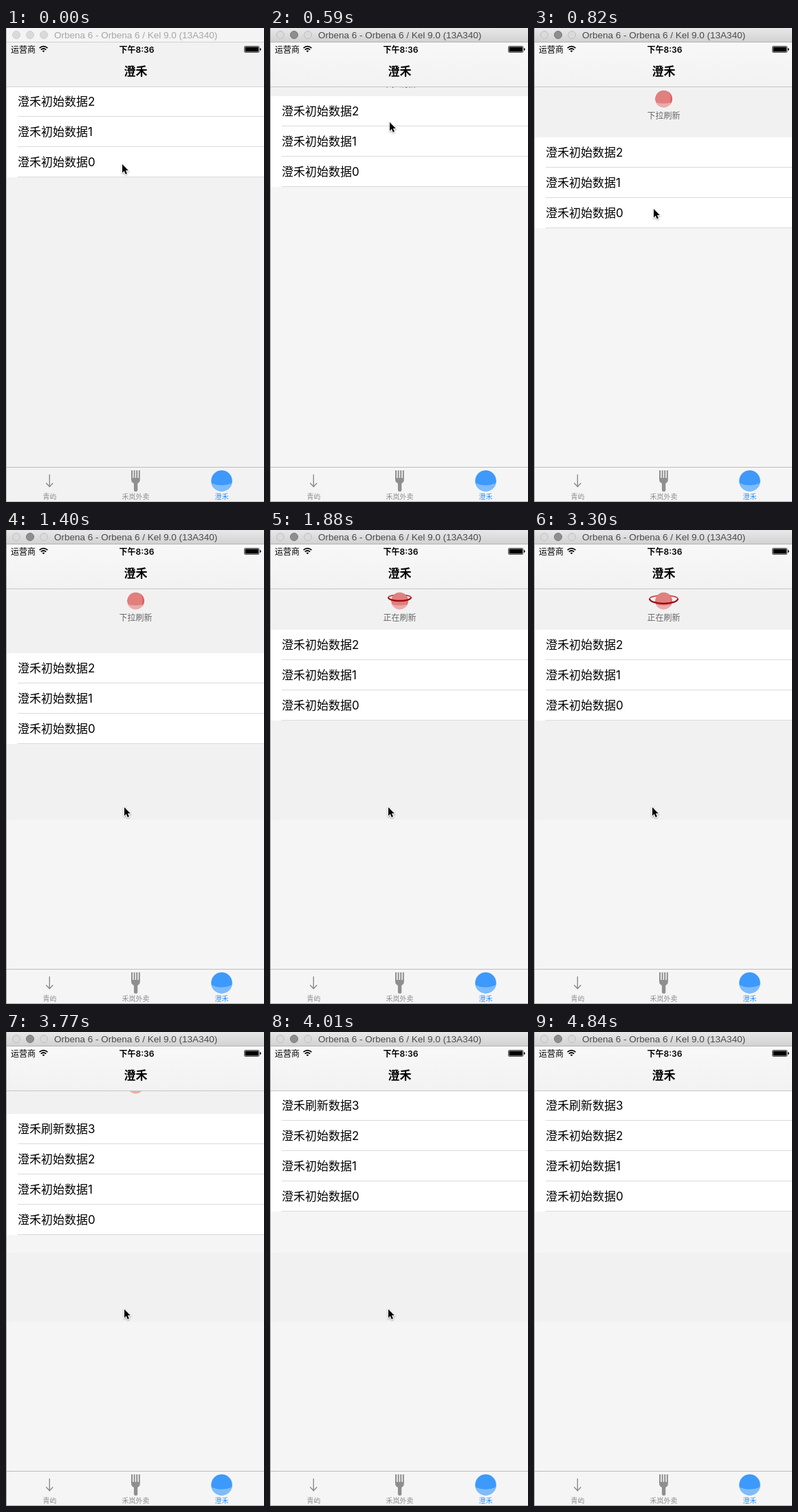
Write an HTML page that moves like this. It is 375 px wide and 689 px high and loops after 5070 ms.

```html
<!DOCTYPE html>
<html lang="zh">
<head>
<meta charset="utf-8">
<style>
  html, body { margin: 0; width: 100%; height: 100%; overflow: hidden; background: #f2f2f2; }
  svg { display: block; width: 375px; height: 689px; }
  text { font-family: Inter, "Noto Sans CJK SC", "Noto Sans CJK", sans-serif; }
  .mid { text-anchor: middle; }
  .tab text { font-size: 10px; text-anchor: middle; }
  #title { font: 13.5px "Liberation Sans", Arial, sans-serif; }
  #cursor { filter: drop-shadow(0 1px 1px rgba(0, 0, 0, .35)); }
</style>
</head>
<body>
<svg viewBox="0 0 375 689">
  <defs>
    <linearGradient id="chrome" x2="0" y2="1">
      <stop stop-color="#e8e8e8"/><stop offset="1" stop-color="#d2d2d2"/>
    </linearGradient>
    <linearGradient id="navFill" x2="0" y2="1">
      <stop stop-color="#f8f8f8"/><stop offset="1" stop-color="#f2f2f2"/>
    </linearGradient>
    <clipPath id="ball"><circle r="12.5"/></clipPath>
    <clipPath id="tabBall"><circle cx="313.5" cy="658.2" r="15.3"/></clipPath>
  </defs>

  <rect id="page" width="375" height="689"/>
  <rect id="gap" y="86" width="375" fill="#f1f1f1"/>
  <rect id="band" width="375" fill="#f1f1f1"/>

  <g id="header">
    <g transform="translate(188.5 103)">
      <path id="back" fill="none" stroke="#b03a3c" stroke-width="1.5"/>
      <g clip-path="url(#ball)">
        <circle r="12.5" fill="#e27f7f"/>
        <path id="shade" d="M6-12Q13-3 8 8L14 8V-12Z" fill="#df5f5f"/>
        <path d="M-13 4Q-3 9 13 5V13H-13Z" fill="#ecabab"/>
      </g>
      <path id="front" fill="none" stroke="#a00c10" stroke-width="2.3"/>
    </g>
    <text id="label" class="mid" x="188.5" y="132" font-size="12" fill="#666"></text>
  </g>

  <g id="list"></g>

  <rect id="nav" y="20" width="375" height="65"/>
  <rect id="navLine" y="85" width="375" height="1"/>
  <text x="7" y="35.5" font-size="12">运营商</text>
  <g fill="none" stroke="#000" stroke-width="1.7">
    <path d="M48.6 29.2Q54.5 24 60.4 29.2M50.8 31.6Q54.5 28.4 58.2 31.6"/>
    <path d="M52.6 33.2Q54.5 31.6 56.4 33.2L54.5 35.3Z" fill="#000" stroke="none"/>
  </g>
  <text class="mid" x="190" y="35.5" font-size="12" font-weight="600">下午8:36</text>
  <rect x="346.5" y="26.5" width="21.5" height="9" rx="1.5" fill="none" stroke="#555"/>
  <rect x="347.5" y="27.5" width="19.5" height="7"/>
  <path d="M369 29Q370.8 29.5 370.8 31T369 33Z"/>
  <text class="mid" x="188.5" y="69" font-size="17" font-weight="600">澄禾</text>

  <rect id="bar" width="375" height="20"/>
  <rect id="barLine" y="20" width="375" height="1"/>
  <g id="lights" stroke-width="1">
    <circle cx="15" cy="10" r="5.5"/><circle cx="35" cy="10" r="5.5"/><circle cx="55" cy="10" r="5.5"/>
  </g>
  <text id="title" x="70" y="15">Orbena 6 - Orbena 6 / Kel 9.0 (13A340)</text>

  <g class="tab" fill="#8f8f8f">
    <rect id="tabFill" y="639" width="375" height="49"/>
    <rect y="638" width="375" height="1" fill="#bdbdbd"/>
    <path d="M63.3 649V666.5M58.3 661.5L63.3 666.7L68.3 661.5" fill="none" stroke="#8a8a8a" stroke-width="1.4"/>
    <path d="M182 643h2v11h1.6v-11h2v11h1.6v-11h2v11h1.6v-11h2v13.500q0 3.500-3.500 5.500v9.500q0 2.300-2.700 2.300t-2.700-2.300v-9.500q-3.900-2-3.900-5.500Z"/>
    <g clip-path="url(#tabBall)">
      <rect x="298" y="642" width="32" height="32" fill="#3d99fc"/>
      <path d="M298 661.5Q313 668 329 661.5V674H298Z" fill="#7dbcfd"/>
    </g>
    <text x="63.5" y="685">青屿</text>
    <text x="188.5" y="685">禾岚外卖</text>
    <text x="313.5" y="685" fill="#2f8ff8">澄禾</text>
  </g>
  <rect id="edge" width="1" height="689"/>
  <rect id="foot" y="688" width="375" height="1"/>
  <path id="cursor" d="M1 1V13.5L3.8 10.8L5.8 15.5L7.9 14.6L5.9 10H9.8Z" stroke="#fff" stroke-width="1.8" paint-order="stroke"/>
</svg>
<script>
const LOOP = 5070, STEP = 117.8, LEAD = 14, LAST = 41;
const ROW = 44, TOP = 85, HOLD = 60;
const REFRESH = 13, LOADED = 31, ACTIVE = 5;

// tracks: [step, value, ...]
const pull = [[4, 0], [5, 14], [6, 46], [7, 74], [8, 99], [9, 119], [10, 128], [11, 120],
  [12, 94], [13, 74], [14, 64], [15, 60], [31, 60], [32, 34], [33, 10], [34, 0]];
const pointer = [[0, 168, 197], [2, 172, 135], [4, 173, 111], [5, 173, 136], [6, 173, 200],
  [7, 173, 262], [8, 172, 325], [9, 171, 375], [10, 171, 401], [11, 171, 402], [35, 171, 402],
  [36, 212, 449], [37, 301, 562], [38, 327, 608], [39, 335, 650], [40, 342, 687]];
// half width, centre, front depth, back depth
const ring = [[13, 13.5, -6, 3, 3], [16, 16.5, -5, 5, 3.5], [20, 18.5, 2, 6, 4], [23, 19.5, 3, 8, 5],
  [25, 19.5, 1, 7, 4], [28, 20.5, -3, 7, 5], [30, 22.5, -3, 7, 5]];

const $ = id => document.getElementById(id);
const set = (id, attrs) => {
  for (const name in attrs) $(id).setAttribute(name, attrs[name]);
};
const show = (id, on) => set(id, { visibility: on ? 'visible' : 'hidden' });

function sample(track, k) {
  const i = track.findIndex(key => key[0] > k);
  if (i < 0) return track[track.length - 1].slice(1);
  if (i === 0) return track[0].slice(1);
  const a = track[i - 1], b = track[i], p = (k - a[0]) / (b[0] - a[0]);
  return a.slice(1).map((v, n) => v + (b[n + 1] - v) * p);
}

const rowMarkup = (text, i) =>
  `<rect y="${i * ROW}" width="375" height="${ROW}" fill="#fff"/>` +
  `<rect x="17" y="${i * ROW + 43}" width="358" height="1" fill="#dadada"/>` +
  `<text x="17" y="${i * ROW + 28}" font-size="17">${text}</text>`;

const before = [2, 1, 0].map(n => '澄禾初始数据' + n);
const pages = [before, ['澄禾刷新数据3', ...before]].map(rows => rows.map(rowMarkup).join(''));
let page = -1;

function drawWindow(on) {
  const base = on ? '#f5f5f5' : '#f2f2f2';
  set('page', { fill: base });
  set('tabFill', { fill: base });
  set('nav', { fill: on ? 'url(#navFill)' : base });
  set('navLine', { fill: on ? '#c6c6c6' : '#d2d2d2' });
  set('bar', { fill: on ? 'url(#chrome)' : '#f4f4f4' });
  set('barLine', { fill: on ? '#b4b4b4' : '#d0d0d0' });
  set('title', { fill: on ? '#4a4a4a' : '#a6a6a6' });
  set('edge', { fill: on ? '#9c9c9c' : '#b8b8b8' });
  set('foot', { fill: on ? '#a8a8a8' : '#bcbcbc' });
  [...$('lights').children].forEach((dot, i) => {
    const dark = on && i === 1;
    dot.setAttribute('fill', dark ? '#8e8e8e' : '#dadada');
    dot.setAttribute('stroke', dark ? '#777' : on ? '#c0c0c0' : '#cfcfcf');
  });
}

function drawRing(k) {
  const [w, y, front, back] = sample(ring, k);
  const arc = (depth, sweep) => `M${-w} ${y}A${w} ${depth} 0 0 ${sweep} ${w} ${y}`;
  set('front', { d: arc(front, 0) });
  set('back', { d: arc(back, 1) });
}

function draw(k) {
  const [y] = sample(pull, k);
  const loaded = k >= LOADED, busy = k >= REFRESH && !loaded;
  const bottom = TOP + y + (loaded ? 4 : 3) * ROW;

  drawWindow(k >= ACTIVE);
  if (page !== +loaded) $('list').innerHTML = pages[page = +loaded];
  set('list', { transform: `translate(0 ${TOP + Math.round(y)})` });
  set('gap', { height: Math.max(0, y) });

  const bandTop = loaded ? 321 : bottom;
  show('band', k >= 10);
  set('band', { y: bandTop, height: Math.max(0, 421 - bandTop) });

  show('header', y > 0);
  set('header', { transform: `translate(0 ${Math.min(y, HOLD) - HOLD})` });
  $('label').textContent = loaded ? '' : busy ? '正在刷新' : '下拉刷新';
  set('shade', { 'fill-opacity': busy ? 0.4 : 1 });
  set('front', { display: busy ? 'inline' : 'none' });
  set('back', { display: busy ? 'inline' : 'none' });
  if (busy) drawRing(k);

  show('cursor', k < LAST);
  set('cursor', { transform: `translate(${sample(pointer, k).map(Math.round).join(' ')})` });
}

const start = performance.now();
function tick() {
  const t = (performance.now() - start) % LOOP;
  draw(Math.min(LAST, Math.floor((t + LEAD) / STEP)));
  requestAnimationFrame(tick);
}
tick();
</script>
</body>
</html>
```
